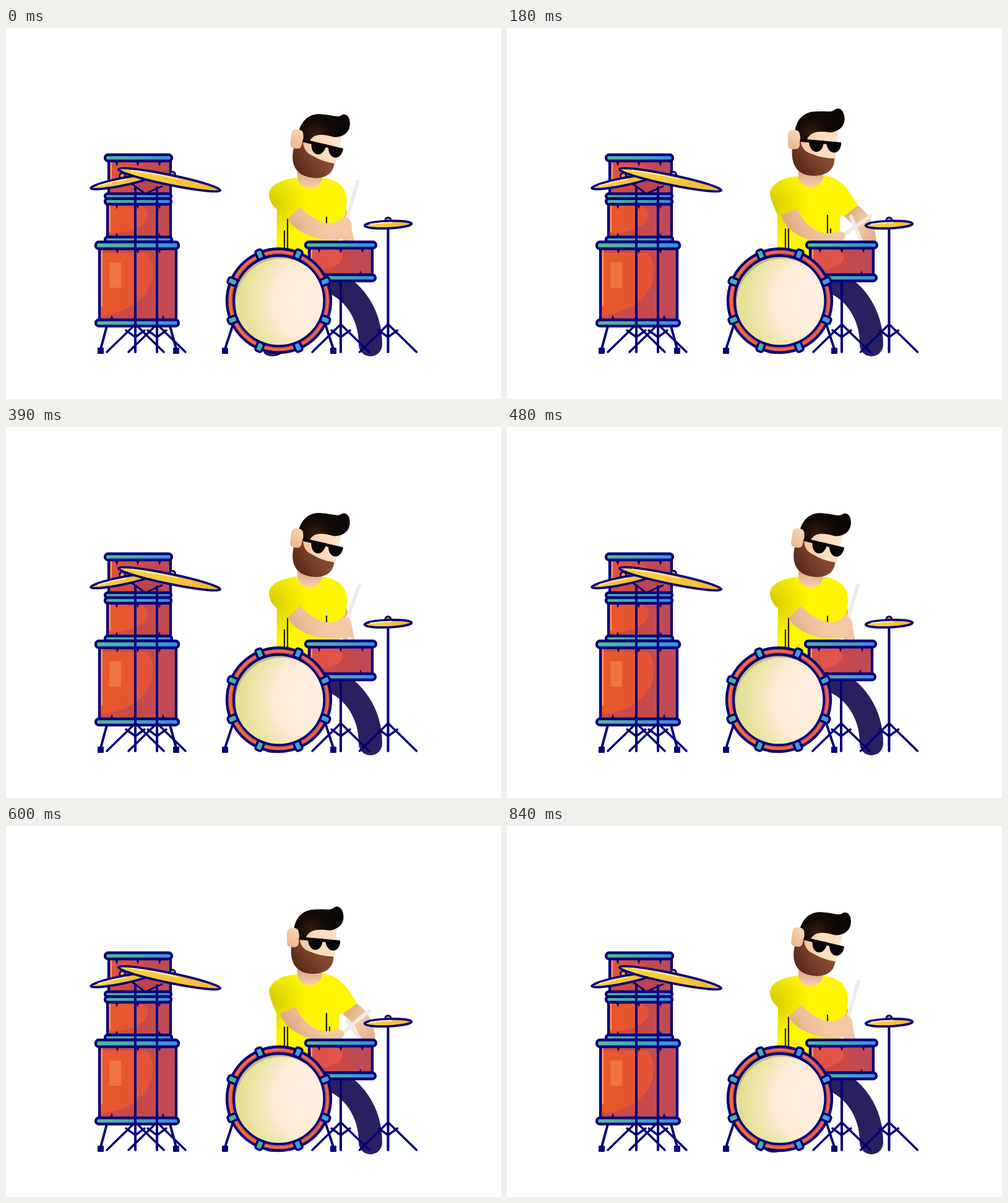
Animation of 800 by 600 pixels, one loop 0.87 s. Source, as an HTML page with a canvas:

```html
<!DOCTYPE html>
<html>
<head>
<meta charset="utf-8">
<style>
html, body { margin: 0; width: 100%; height: 100%; overflow: hidden; background: #fff; }
canvas { display: block; }
</style>
</head>
<body>
<canvas id="stage" width="800" height="600"></canvas>
<script>
const ctx = document.getElementById('stage').getContext('2d');
const NAVY = '#03007a', BEAT = 435;

const addStops = (g, colors) => {
  colors.forEach((c, i) => g.addColorStop(i / (colors.length - 1), c));
  return g;
};
const linear = (x0, y0, x1, y1, ...colors) => addStops(ctx.createLinearGradient(x0, y0, x1, y1), colors);
const across = (x0, x1, ...colors) => linear(x0, 0, x1, 0, ...colors);
const radial = (x, y, r, ...colors) => addStops(ctx.createRadialGradient(x, y, 0, x, y, r), colors);

function shape(path, fill, stroke, width = 4.3) {
  const p = typeof path === 'string' ? new Path2D(path) : path;
  if (fill) { ctx.fillStyle = fill; ctx.fill(p); }
  if (stroke) { ctx.strokeStyle = stroke; ctx.lineWidth = width; ctx.stroke(p); }
}
function line(d, width = 4, color = NAVY) { shape(d, null, color, width); }
function box(x, y, w, h, r, fill, stroke, width) {
  const p = new Path2D();
  p.roundRect(x, y, w, h, r);
  shape(p, fill, stroke, width);
}
function oval(x, y, rx, ry, angle, fill, stroke, width) {
  const p = new Path2D();
  p.ellipse(x, y, rx, ry, angle, 0, 7);
  shape(p, fill, stroke, width);
}
// Blends two paths that share the same commands
function blend(a, b, k) {
  const number = /-?[\d.]+/g, goal = b.match(number);
  let i = 0;
  return new Path2D(a.replace(number, v => +v + (goal[i++] - v) * k));
}
function smooth(a, b, v) {
  const k = Math.min(1, Math.max(0, (v - a) / (b - a)));
  return k * k * (3 - 2 * k);
}
// keys: [phase, x, y] sorted by phase
function along(keys, p) {
  const i = keys.findIndex(k => k[0] > p);
  const [t0, x0, y0] = keys[i - 1], [t1, x1, y1] = keys[i];
  const k = (p - t0) / (t1 - t0);
  return [x0 + (x1 - x0) * k, y0 + (y1 - y0) * k];
}

function rim(x, y, w, h) {
  box(x + 2, y + 2, w - 4, h - 4, 5, across(x, x + w, '#55bd94', '#45a9b4', '#3b8be8'), NAVY);
}
function spikes(y, dir, ...xs) {
  for (const x of xs) shape(`M${x - 2.5} ${y}h5l-2.5 ${7 * dir}z`, NAVY);
}
function shell(x, y, w, h, bulge, depth, ...glow) {
  const edge = x + w * bulge;
  shape(`M${x} ${y}h${w}v${h}h${-w}z`, across(x, x + w, '#d44c42', '#c7494a', '#bf4a58'));
  shape(`M${x} ${y + h * .07}H${edge - 14}C${edge + 9} ${y + h * .25} ${edge + 2} ${y + h * depth * .93} ${x} ${y + h * depth}z`,
    across(x, edge, ...glow));
  line(`M${x + 4} ${y + 4}V${y + h * .8}`, 2, '#f0a06c');
  line(`M${x} ${y}h${w}v${h}h${-w}z`, 4.3);
}
function tripod(x, top) {
  line(`M${x} ${top}V524`);
  line(`M${x - 5} 484L${x - 46} 524M${x + 5} 484L${x + 46} 524M${x - 15} 489L${x} 500L${x + 15} 489M${x - 5} 484L${x} 479L${x + 5} 484`, 3.5);
}
function foot(x0, y0, x1) {
  line(`M${x0} ${y0}L${x1} 519`);
  box(x1 - 5, 517, 10, 10, 1, NAVY);
}
function cymbal(x, y, rx, ry, angle, bellX, bellY) {
  oval(bellX, bellY, 4.5, 4.5, 0, '#eda52c', NAVY, 3);
  oval(x, y, rx, ry, angle, across(x - rx, x + rx, '#fbd548', '#f4b72e'), NAVY, 3.7);
  ctx.save();
  ctx.translate(x, y);
  ctx.rotate(angle);
  line(`M${-rx * .75} ${-ry * .3}Q${-rx * .3} ${-ry * .65} ${rx * .15} ${-ry * .5}`, 2, '#ffedb0');
  ctx.restore();
}

function tower() {
  const glow = ['#ea592a', '#e5562f', '#e2533e'];
  foot(163, 482, 153);
  foot(265, 482, 275);
  shell(166, 212, 100, 58, .62, .8, '#df5140', '#d54d42');
  rim(158, 203, 112, 14);
  spikes(217, 1, 179, 213, 248);
  rim(158, 266, 111, 12);
  shell(164, 283, 102, 57, .66, .88, ...glow);
  rim(158, 274, 111, 13);
  spikes(286, 1, 179, 213, 248);
  spikes(338, -1, 179, 248);
  rim(158, 336, 112, 12);
  shell(151, 355, 124, 118, .72, .93, ...glow);
  box(167, 379, 19, 41, 0, '#ee7440');
  rim(143, 344, 138, 15);
  spikes(358, 1, 180, 213, 248);
  rim(143, 470, 138, 14);
  spikes(471, -1, 171, 208, 254);
  shape('M198 248L225 268L252 255L235 242Z', '#bd4450');
  line('M198 248L225 268L252 256', 3);
  tripod(209, 258);
  tripod(244, 258);
  cymbal(187, 249, 51, 6, -.2, 188, 239);
  cymbal(264, 245.5, 84, 8, .205, 269, 237);
}

function snare() {
  shell(490, 355, 102, 46, .55, .83, '#dc5146', '#e6554a');
  rim(482, 344, 118, 14);
  spikes(357, 1, 506, 541, 576);
  spikes(399, -1, 573);
  rim(484, 397, 115, 14);
}

function bassDrum() {
  oval(441, 441, 84, 84, 0, across(357, 525, '#ec5a2c', '#df523f', '#d04d4c'), NAVY);
  oval(441, 441, 79, 79, 0, null, 'rgba(255,190,140,.35)', 2);
  oval(441, 441, 73, 73, 0, '#c5bd84', NAVY);
  ctx.save();
  ctx.beginPath();
  ctx.arc(441, 441, 71.5, 0, 7);
  ctx.clip();
  oval(445, 447, 74, 74, 0, radial(497, 441, 132, '#feeedd', '#feeedd', '#fbecd5', '#eae5a6', '#e2dc8a'));
  ctx.restore();
  for (let i = 0; i < 8; i++) {
    const angle = (i + .5) * Math.PI / 4;
    ctx.save();
    ctx.translate(441 + 81 * Math.cos(angle), 441 + 81 * Math.sin(angle));
    ctx.rotate(angle);
    box(-7.5, -5.5, 15, 11, 3.5, Math.cos(angle) < .2 ? '#48b39d' : '#429fd2', NAVY, 3.7);
    ctx.restore();
  }
}

function head(dip) {
  ctx.save();
  ctx.translate(473, 224);
  ctx.rotate(dip * .141);
  ctx.translate(-473, -224);
  // face
  shape('M473 164L535 164L531 214L500 226L473 212Z', across(473, 530, '#efc19c', '#fbdbb9', '#fee2c5'));
  // beard
  shape('M461 194Q468 190 474 180Q476 199 491 203Q510 211 529 211C530 230 515 239 496 239C472 239 458 224 461 194Z',
    linear(465, 232, 505, 200, '#4f2417', '#6e3925', '#86492f'));
  // hair
  shape('M465 168C468 147 480 135 500 135C515 134 525 137 530 132C535 128 543 131 545 142C548 157 538 167 523 169C507 167 491 166 485 180L474 182Q475 166 465 168Z',
    radial(493, 168, 45, '#321b0e', '#140b07', '#0b0705'));
  box(454, 165, 19, 31, 7, linear(455, 194, 472, 168, '#eab58d', '#fbd5b2'));
  // sunglasses
  shape('M474 179L540 185L540 190L474 184Z', '#080606');
  shape('M488 182H512C512 207 488 206 488 182ZM516 184L540 186C540 207 517 207 516 184Z', '#080606');
  ctx.restore();
}

function stick(base, tip) {
  line(`M${base}L${tip}`, 6, '#f0ebe7');
}

const leftTip = [[0, 568, 249], [45, 567, 256], [165, 587, 299], [180, 588, 304], [232, 588, 320],
  [285, 589, 293], [300, 589, 288], [405, 568, 251], [436, 568, 249]];
const rightTip = [[0, 556, 346], [45, 556, 346], [165, 552, 315], [180, 556, 305], [232, 565, 292],
  [285, 549, 323], [300, 550, 320], [405, 556, 346], [436, 556, 346]];

function drummer(phase, dip) {
  line('M520 408C562 422 589 463 589 512', 38, '#2a205f');
  const away = Math.min(phase, BEAT - phase);
  oval(431, 519 + 4 * Math.max(0, 1 - away / 45), 15, 8, 0, '#2a205f');

  shape(blend('M543 303L567 287C585 300 597 318 597 352L573 352C572 330 560 318 543 303Z',
    'M535 300L549 290C554 310 560 325 564 352L545 352C545 330 540 315 535 300Z', dip),
    linear(545, 300, 597, 335, '#d9a883', '#f3c8a4', '#e2b28d'));
  stick([573 - 11 * dip, 346 + 4 * dip], along(rightTip, phase));

  shape(blend('M470 240C445 240 425 254 425 268C426 280 434 292 437 304L437 370L538 370L538 304L545 304L567 287C553 262 540 242 511 238Z',
    'M470 242C442 246 425 254 425 270C426 283 434 289 438 294L437 370L538 370L538 314L548 304L551 284C552 260 540 246 511 242Z', dip),
    radial(427, 284, 60, '#d4c900', '#eae000', '#fdf600'));
  line(blend('M450 325V360M455 325V360M518 303V340M523 325V340',
    'M450 328V360M455 309V360M518 306V320M523 325V340', dip), 2.2, '#201c08');

  box(471, 205, 40, 52 + 2 * dip, 18, linear(0, 232, 0, 258, '#d9a883', '#f6cfab'));
  head(dip);

  stick([543 + 6 * dip, 335 - 19 * dip], along(leftTip, phase));
  shape(blend('M443 303C450 328 482 347 522 347C550 350 553 329 536 329C530 329 527 332 520 332C500 332 480 318 468 292Z',
    'M455 309C472 334 505 345 540 342C560 339 565 313 551 307C542 304 537 315 528 316C510 317 490 305 475 289Z', dip),
    linear(455, 335, 510, 305, '#d9a47d', '#ecbd97', '#f3c9a5'));
}

function draw(ms) {
  const phase = Math.floor(ms % 870 / 30) * 30 % BEAT;
  const dip = 1 - smooth(45, 160, phase) + smooth(270, 402, phase);
  const kick = -2 * Math.max(0, 1 - Math.abs(phase - 45) / 32);
  ctx.fillStyle = '#fff';
  ctx.fillRect(0, 0, 800, 600);
  ctx.lineCap = ctx.lineJoin = 'round';
  tower();
  drummer(phase, dip);
  tripod(541 + kick / 2, 408);
  foot(366, 482, 354);
  foot(517, 482, 529);
  ctx.save();
  ctx.translate(kick, 0);
  snare();
  bassDrum();
  ctx.restore();
  tripod(617.5, 322);
  cymbal(617.5, 318, 38, 6, -.04, 617.5, 311);
}

const start = performance.now();
function tick() {
  draw(performance.now() - start);
  requestAnimationFrame(tick);
}
tick();
</script>
</body>
</html>
```
